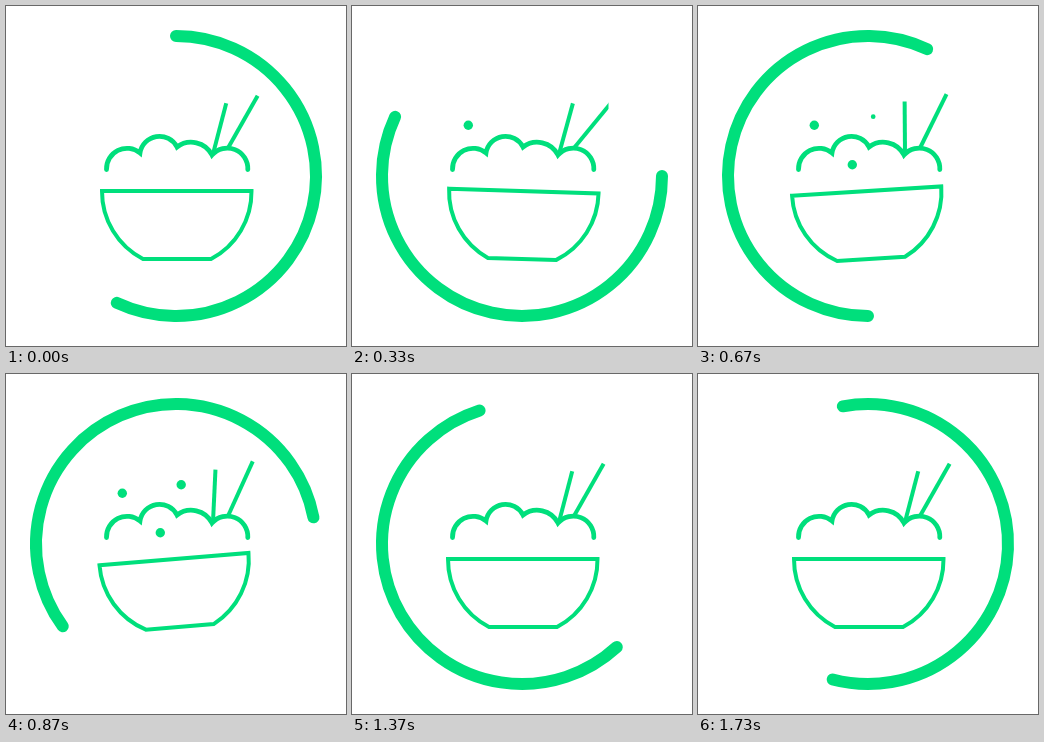
Recreate the animation shown at these times as an HTML page. Size 340 by 340 pixels, loop 1760 ms.

```html
<!DOCTYPE html>
<html lang="en">
<head>
<meta charset="utf-8">
<title>Rice bowl loader</title>
<style>
  html, body { margin: 0; width: 100%; height: 100%; overflow: hidden; background: #fff; }
  svg { display: block; width: 100%; height: 100%; }
</style>
</head>
<body>
<svg viewBox="0 0 340 340" fill="none" stroke="#00df7c" stroke-width="4">
  <clipPath id="stickArea"><path d="M180 80H256.5V160H180Z"/></clipPath>
  <path id="ring" stroke-width="12" stroke-linecap="round"/>
  <g clip-path="url(#stickArea)">
    <path id="leftStick" d="M207 148V95.5"/>
    <path id="rightStick" d="M222 142V82"/>
  </g>
  <path stroke-width="4.8" stroke-linecap="round"
    d="M100.5 163.5A20.5 20.5 0 0 1 134 147A19.7 19.7 0 0 1 171 141A23.5 23.5 0 0 1 206 149A20.5 20.5 0 0 1 241.8 163.5"/>
  <path id="bowl" d="M96 185H245.5A76 76 0 0 1 205 253H137A76 76 0 0 1 96 185Z"/>
  <g id="dots" fill="#00df7c" stroke="none">
    <circle cx="116.3" cy="119.3"/>
    <circle cx="154.3" cy="158.7"/>
    <circle cx="175.2" cy="110.7"/>
  </g>
</svg>
<script>
const LOOP = 1760, STEP = 1000 / 30, SPAN = 205;
const byId = id => document.getElementById(id);
const [ring, leftStick, rightStick, bowl] = ['ring', 'leftStick', 'rightStick', 'bowl'].map(byId);
const dots = [...byId('dots').children];
const clamp = x => Math.max(0, Math.min(1, x));

// Keys are [beat, degrees] pairs, joined by cosine easing.
const bowlKeys = [[0, 0], [6, 2.6], [25, -4.7], [50, 0]];
const leftKeys = [[0, 14.6], [5, 20.6], [20, -0.4], [40, 14.6]];
const rightKeys = [[0, 29.6], [7, 40.6], [24, 24.1], [38, 29.6]];

function ease(keys, beat) {
  const i = keys.findIndex(key => key[0] > beat);
  if (i < 0) return keys[keys.length - 1][1];
  const [t0, a] = keys[i - 1], [t1, b] = keys[i];
  return a + (b - a) * (1 - Math.cos(Math.PI * (beat - t0) / (t1 - t0))) / 2;
}

// One beat per step at first, then roughly twice as fast.
function beatAt(step) {
  const fast = Math.max(0, step - 27);
  return Math.min(step, 27) + fast * (17.54 + 0.045 * fast) / 9;
}

function ringPoint(degrees) {
  const a = degrees * Math.PI / 180;
  return `${170 + 140 * Math.sin(a)} ${170 - 140 * Math.cos(a)}`;
}

function rotate(el, degrees, x, y) {
  el.setAttribute('transform', `rotate(${degrees} ${x} ${y})`);
}

function draw(ms) {
  const beat = beatAt(Math.floor((ms % LOOP + 3.4) / STEP));
  const tail = beat * 9;
  ring.setAttribute('d', `M${ringPoint(tail)}A140 140 0 1 1 ${ringPoint(tail + SPAN)}`);
  rotate(bowl, ease(bowlKeys, beat), 170.7, 219);
  rotate(leftStick, ease(leftKeys, beat), 207, 148);
  rotate(rightStick, ease(rightKeys, beat), 222, 142);
  dots.forEach((dot, i) => {
    const local = beat - 3 - 7 * i;
    dot.setAttribute('r', 4.7 * Math.min(clamp(local / 6), clamp((34 - local) / 6)));
  });
}

const start = performance.now();
function tick() {
  draw(performance.now() - start);
  requestAnimationFrame(tick);
}
tick();
</script>
</body>
</html>
```
